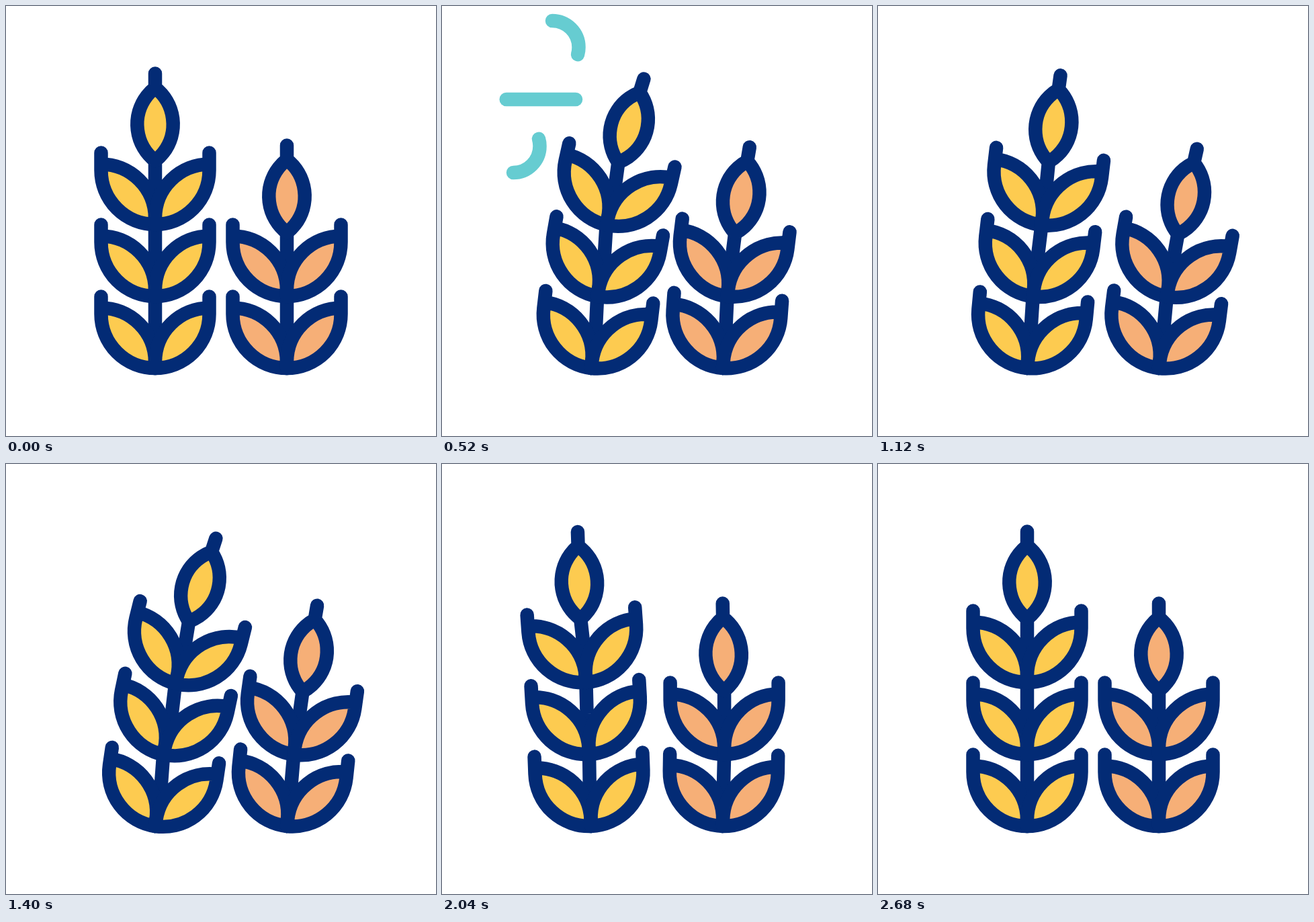
Write an HTML page with a canvas that moves like this. It is 640x640 px and loops after 3 s.

```html
<!DOCTYPE html>
<html>
<head>
<meta charset="utf-8">
<title>Wheat in the wind</title>
<style>
html, body { margin: 0; width: 100%; height: 100%; overflow: hidden; background: #fff; }
canvas { display: block; }
</style>
</head>
<body>
<canvas id="stage" width="640" height="640"></canvas>
<script>
const ctx = document.getElementById('stage').getContext('2d');
const LOOP = 3000, STEP = 40;
const NAVY = '#032b75', TEAL = '#66ccd1';
const BASE = 539, GAP = 107, R = 80.5;

// Pivots are heights above the base; the last part of each stalk is its head.
// Poses list the absolute lean of every part in degrees.
const stalks = [
  {
    x: 222, color: '#fdcb50', delay: 0, pivots: [0, 162, 333, 349],
    peak: [12.1, 18.3, 23, 31], dip: [4.6, 5.5, 4.9, 5.1], back: [-5.2, -7.9, -9.8, -8.9]
  },
  {
    x: 418, color: '#f6af77', delay: 80, pivots: [0, 134, 201],
    peak: [12, 20, 27.2], dip: [4.4, 4.7, 4.7], back: [-5.1, -10.9, -16.4]
  }
];
const keyTimes = [200, 800, 1200, 1600, 2200, 2600];

function ease(t, from, to) {
  const u = Math.min(1, Math.max(0, (t - from) / (to - from)));
  return u * u * (3 - 2 * u);
}

function leanAt(stalk, part, t) {
  const poses = [0, stalk.peak[part], stalk.dip[part], stalk.peak[part], stalk.back[part], 0];
  return poses.slice(1).reduce((lean, pose, i) =>
    lean + (pose - poses[i]) * ease(t - stalk.delay, keyTimes[i], keyTimes[i + 1]), 0);
}

function drawLeaf(side) {
  ctx.save();
  ctx.scale(side, 1);
  ctx.beginPath();
  ctx.moveTo(-R, -106.5);
  ctx.arc(-R, -9, R, -Math.PI / 2, 0);
  ctx.arc(0, -R, R, Math.PI / 2, Math.PI);
  ctx.lineTo(-R, -9 - R);
  ctx.fill();
  ctx.stroke();
  ctx.restore();
}

function drawHead() {
  const r = 69, shift = 42.3, a = Math.acos(shift / r);
  ctx.beginPath();
  ctx.arc(-shift, 0, r, -a, a);
  ctx.arc(shift, 0, r, Math.PI - a, Math.PI + a);
  ctx.closePath();
  ctx.lineTo(0, -75.5);
  ctx.fill();
  ctx.stroke();
}

function drawStalk(stalk, t) {
  const last = stalk.pivots.length - 1;
  const headY = -GAP * last - 42;
  let frame = new DOMMatrix().translate(stalk.x, BASE), lean = 0;
  const frames = stalk.pivots.map((pivot, part) => {
    const next = leanAt(stalk, part, t);
    frame = frame.translate(0, -pivot).rotate(next - lean).translate(0, pivot);
    lean = next;
    return frame;
  });

  ctx.strokeStyle = NAVY;
  ctx.fillStyle = stalk.color;
  ctx.beginPath();
  frames.forEach((m, part) => {
    const heights = part < last ? [-GAP * part, -GAP * part - 60] : [headY + 54];
    for (const y of heights) {
      const p = m.transformPoint({ x: 0, y });
      ctx.lineTo(p.x, p.y);
    }
  });
  ctx.stroke();

  frames.forEach((m, part) => {
    ctx.setTransform(m.translate(0, part < last ? -GAP * part : headY));
    if (part < last) {
      drawLeaf(1);
      drawLeaf(-1);
    } else {
      drawHead();
    }
  });
  ctx.resetTransform();
}

// A gust is a line, optionally ending in a half-circle curl (up: -1, down: 1).
function drawGust(t, x1, x2, y, curl, delay) {
  const r = 39.5;
  const length = x2 - x1 + (curl ? Math.PI * r : 0);
  const head = length * ease(t - delay, 120, 460);
  const tail = length * ease(t - delay, 300, 670);
  if (head - tail < 0.5 || t >= 720) return;
  ctx.strokeStyle = TEAL;
  ctx.setLineDash([head - tail, 999]);
  ctx.lineDashOffset = -tail;
  ctx.beginPath();
  ctx.moveTo(x1, y);
  ctx.lineTo(x2, y);
  if (curl) ctx.arc(x2, y + curl * r, r, -curl * Math.PI / 2, curl * Math.PI / 2, curl < 0);
  ctx.stroke();
  ctx.setLineDash([]);
}

function draw(now) {
  const t = Math.floor((now % LOOP) / STEP) * STEP;
  ctx.clearRect(0, 0, 640, 640);
  ctx.lineWidth = 20.5;
  ctx.lineCap = ctx.lineJoin = 'round';
  drawGust(t, 85, 164, 101, -1, 0);
  drawGust(t, 27, 199, 139, 0, 60);
  drawGust(t, 27, 106, 169, 1, 0);
  for (const stalk of stalks) drawStalk(stalk, t);
  requestAnimationFrame(() => draw(performance.now()));
}
draw(0);
</script>
</body>
</html>
```
